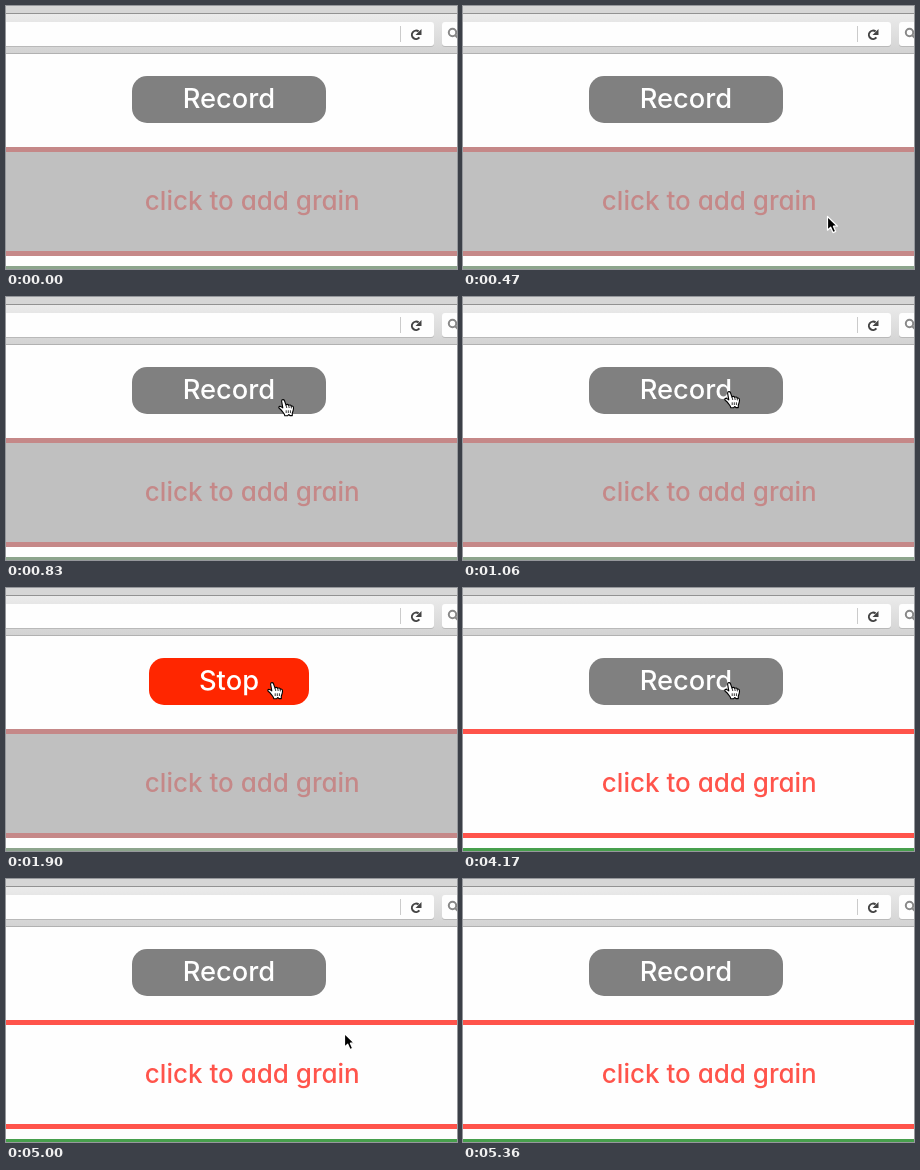
An HTML page for the animation above (6.42 s loop, 451 by 263 pixels).

```html
<!DOCTYPE html>
<html lang="en">
<head>
<meta charset="utf-8">
<title>Record a grain</title>
<style>
  html, body { margin: 0; width: 100%; height: 100%; overflow: hidden; background: #fefefe; }
  svg { display: block; width: 451px; height: 263px; }
  text {
    font-family: Inter, "Open Sans", sans-serif;
    font-weight: 500;
    font-feature-settings: "cv11";
    text-anchor: middle;
  }
</style>
</head>
<body>
<svg viewBox="0 0 451 263">
  <defs>
    <linearGradient id="chrome" x1="0" y1="0" x2="0" y2="1">
      <stop offset="0" stop-color="#ebebeb"/>
      <stop offset="1" stop-color="#d3d3d3"/>
    </linearGradient>
  </defs>
  <rect width="451" height="263" fill="#fefefe"/>

  <!-- browser toolbar -->
  <rect width="451" height="7" fill="#d6d6d6"/>
  <rect y="7" width="451" height="1" fill="#929292"/>
  <rect y="8" width="451" height="39" fill="url(#chrome)"/>
  <rect y="47" width="451" height="1" fill="#b1b1b1"/>
  <g fill="#b9b9b9">
    <rect x="-9" y="17" width="437" height="24" rx="3"/>
    <rect x="436" y="17" width="30" height="24" rx="3"/>
  </g>
  <g fill="#fefefe">
    <rect x="-9" y="16" width="437" height="24" rx="3"/>
    <rect x="436" y="16" width="30" height="24" rx="3"/>
  </g>
  <rect x="394" y="20" width="1" height="16" fill="#cbcbcb"/>
  <path d="M413.4 31.4A4.2 4.2 0 1 1 412.6 25.4" fill="none" stroke="#444" stroke-width="2"/>
  <path d="M415.5 23V29H409.5Z" fill="#444"/>
  <g fill="none" stroke="#888" stroke-width="2">
    <circle cx="446.5" cy="26.5" r="3.7"/>
    <path d="M449 29L453 33"/>
  </g>

  <!-- page -->
  <rect id="button" y="70" height="47" rx="15"/>
  <text id="label" x="223" y="102" font-size="27.3" fill="#fff"></text>
  <rect id="panel" y="146" width="451" height="99"/>
  <g id="accent">
    <rect y="141" width="451" height="5"/>
    <rect y="245" width="451" height="5"/>
    <text x="246.3" y="204" font-size="26">click to add grain</text>
  </g>
  <rect id="next" y="260" width="451" height="3"/>

  <!-- pointers, hot spot at the origin -->
  <g id="arrow" stroke-linejoin="round">
    <path d="M0.5 0.5V14.2L3.7 11.2L6 16.6L8.7 15.4L6.4 10.2H10.5Z" fill="#000" stroke="#fff" stroke-width="1.2"/>
  </g>
  <g id="hand" fill="#fff" stroke="#000" stroke-width="1.1" stroke-linejoin="round">
    <path d="M-2.4 1.2C-2.6-.7-.1-.9.5.7L2 5.1C2.6 3.9 4.4 4.2 4.7 5.4C5.7 4.5 7 5 7.2 6.2C8.6 5.5 9.6 6.6 9.5 8.2C9.5 10.4 8.7 11.6 8.3 13.2V15.6H5.9L4.8 14.5L3.7 15.7H.8C.6 13.6-1.4 12.2-2.5 10.4C-3.2 9.1-5.2 8.5-5.2 7.4C-4.8 5.7-2.6 6.5-1.2 7.8Z"/>
    <path d="M2 5.1L2.8 8M4.7 5.4L5.2 8M7.2 6.2L7.4 8.4M2.2 10.3V13M4.3 10.3V13M6.4 10.3V13" fill="none" stroke-width=".8"/>
  </g>
</svg>
<script>
  const LOOP = 6420;
  const $ = id => document.getElementById(id);

  const looks = {
    idle: { text: "Record", x: 126, width: 194, fill: "#808080" },
    recording: { text: "Stop", x: 143, width: 160, fill: "#ff2600" }
  };
  const themes = {
    disabled: { panel: "#c0c0c0", accent: "#c58888", next: "#8ca48c" },
    enabled: { panel: "#fefefe", accent: "#ff544b", next: "#479f4c" }
  };

  // time, pointer shape, x, y
  const pointerSteps = [
    [0],
    [470, "arrow", 364, 210],
    [590, "arrow", 322, 152],
    [710, "arrow", 292, 115],
    [830, "hand", 278, 103],
    [950, "hand", 270, 97],
    [1060, "hand", 267, 95],
    [4770, "hand", 277, 100],
    [4880, "hand", 298, 116],
    [5000, "arrow", 338, 154],
    [5120, "arrow", 386, 203],
    [5240, "arrow", 433, 249],
    [5360]
  ];

  function drawButton({ text, x, width, fill }) {
    $("button").setAttribute("x", x);
    $("button").setAttribute("width", width);
    $("button").setAttribute("fill", fill);
    $("label").textContent = text;
  }

  function drawPage(theme) {
    for (const id in theme) $(id).setAttribute("fill", theme[id]);
  }

  function drawPointer(t) {
    const [, shape, x, y] = pointerSteps.findLast(step => step[0] <= t);
    for (const id of ["arrow", "hand"]) {
      $(id).style.display = id === shape ? "" : "none";
    }
    if (shape) $(shape).setAttribute("transform", `translate(${x} ${y})`);
  }

  function draw() {
    const t = performance.now() % LOOP;
    drawButton(t >= 1900 && t < 4170 ? looks.recording : looks.idle);
    drawPage(t < 4170 ? themes.disabled : themes.enabled);
    drawPointer(t);
    requestAnimationFrame(draw);
  }
  draw();
</script>
</body>
</html>
```
